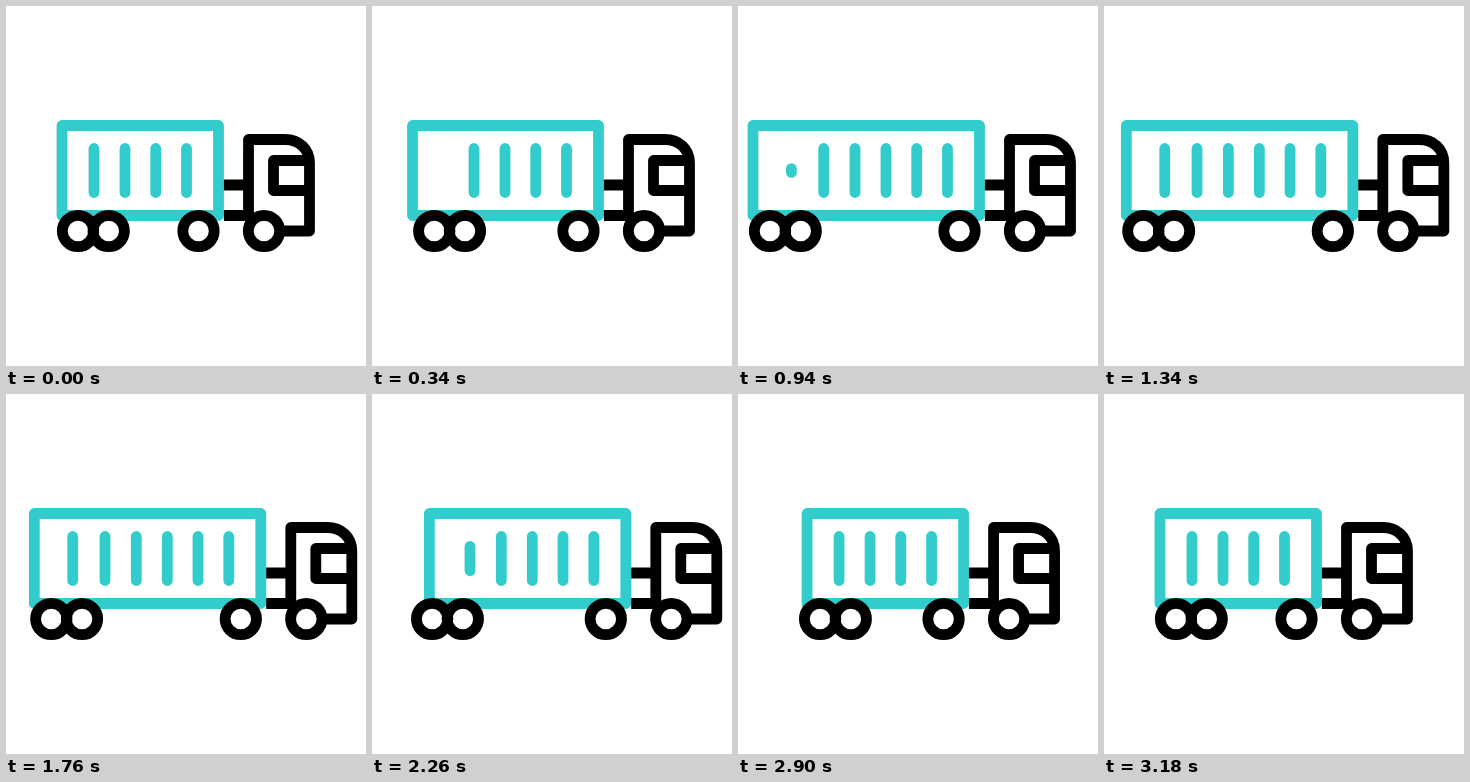
These frames come from a looping animation (360 px wide and 360 px high, 3600 ms). An HTML page:

```html
<!DOCTYPE html>
<html lang="en">
<head>
<meta charset="utf-8">
<title>Stretching truck</title>
<style>
  html, body { margin: 0; height: 100%; overflow: hidden; background: #fff; }
  svg { display: block; width: 100vw; height: 100vh; }
  g { fill: none; stroke-width: 10.8; stroke-linejoin: round; }
  .teal { stroke: #33cccc; }
  .black { stroke: #000; }
  .wheel { fill: #fff; }
</style>
</head>
<body>
<svg viewBox="0 0 360 360">
  <g class="teal">
    <path id="box"/>
    <path id="bars" stroke-linecap="round"/>
  </g>
  <g id="front" class="black">
    <path d="M217.9 179H242M217.9 209.5H242"/>
    <path d="M242.5 211V133.5H279C293 133.5 303.5 143 303.5 157V225H274" stroke-linecap="round"/>
    <path d="M303 154.5H267.5V184.5H303"/>
    <circle class="wheel" cx="192.5" cy="225" r="15.7"/>
    <circle class="wheel" cx="258" cy="225" r="15.7"/>
  </g>
  <g id="rear" class="black">
    <circle class="wheel" cx="72" cy="225" r="15.7"/>
    <circle cx="102.7" cy="225" r="15.7"/>
  </g>
</svg>
<script>
const LOOP = 3600, MOVE_END = 3180, STEP = 20;
const el = id => document.getElementById(id);

// Eased 0..1 progress of t from a to b
function ease(t, a, b) {
  const p = Math.min(1, Math.max(0, (t - a) / (b - a)));
  return p * p * (3 - 2 * p);
}

// Rises over a..b, falls back over c..d
const pulse = (t, a, b, c, d) => ease(t, a, b) - ease(t, c, d);

// Smooth curve through [time, value] points
function curve(pts, t) {
  let i = 0;
  while (i < pts.length - 2 && t > pts[i + 1][0]) i++;
  const slope = k => {
    const a = pts[Math.max(0, k - 1)], b = pts[Math.min(pts.length - 1, k + 1)];
    return (b[1] - a[1]) / (b[0] - a[0]);
  };
  const [t0, v0] = pts[i], [t1, v1] = pts[i + 1];
  const d = t1 - t0, p = (t - t0) / d, q = 1 - p;
  return v0 * q * q * (1 + 2 * p) + v1 * p * p * (3 - 2 * p)
    + d * p * q * (slope(i) * q - slope(i + 1) * p);
}

const drive = [[0, 0], [340, 14], [540, 23.7], [700, 27], [940, 29], [1350, 36.5],
  [1760, 42.3], [2080, 45], [2260, 41.3], [2640, 25], [3180, 0]];

const bar = (x, size) => size > 0 ? `M${x} ${164.5 - 22 * size}V${164.5 + 22 * size}` : "";

function draw(t) {
  const front = curve(drive, t);
  const left = 56 + front - 70 * pulse(t, 0, 760, 1770, 2852);
  const rear = front - 69 * pulse(t, 40, 800, 1908, 3042);
  const bars = [
    [88, 1], [119, 1], [149.7, 1], [180.5, 1],
    [56.7, pulse(t, 540, 840, 2120, 2420)],
    [24.4, pulse(t, 885, 1185, 1820, 2120)]
  ];
  el("box").setAttribute("d", `M${left} 119.5H${212.5 + front}V209.5H${left}Z`);
  el("bars").setAttribute("d", bars.map(([x, size]) => bar(x + front, size)).join(""));
  el("front").setAttribute("transform", `translate(${front})`);
  el("rear").setAttribute("transform", `translate(${rear})`);
}

const start = performance.now();
function tick() {
  const t = (performance.now() - start) % LOOP;
  draw(Math.min(MOVE_END, Math.floor(t / STEP) * STEP));
  requestAnimationFrame(tick);
}
tick();
</script>
</body>
</html>
```
